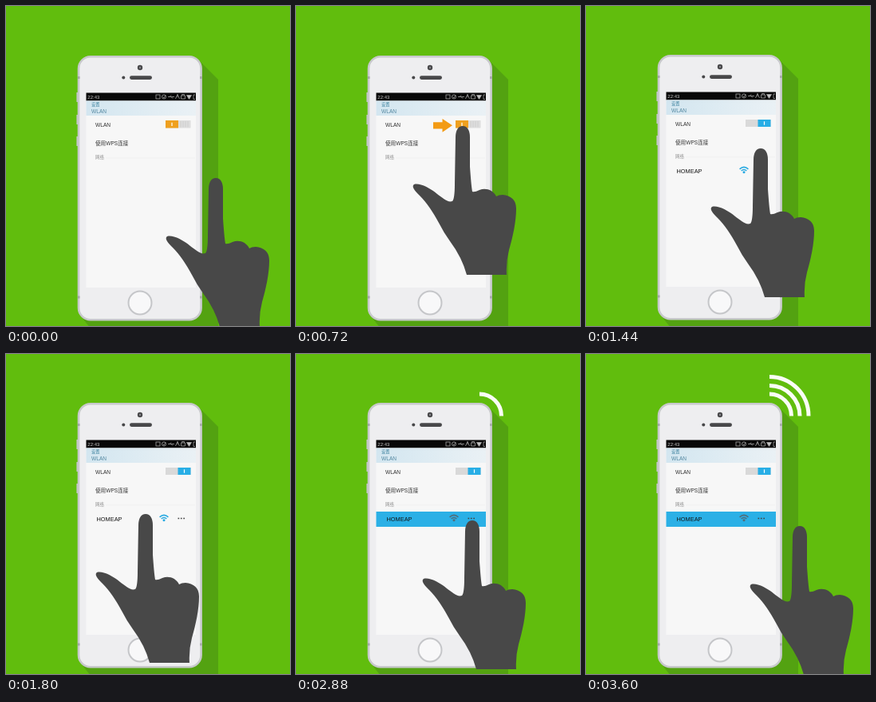
Write an HTML page that moves like this. It is 356x400 px and loops after 3960 ms.

```html
<!DOCTYPE html>
<html>
<head>
<meta charset="utf-8">
<title>WLAN</title>
<style>
  html, body { margin: 0; width: 100%; height: 100%; overflow: hidden; background: #61bd0d; }
  svg { display: block; width: 356px; height: 400px; }
  text { font-family: "Liberation Sans", "Noto Sans CJK SC", "Noto Sans CJK", sans-serif; font-size: 6.6px; fill: #303030; }

  /* Eleven held steps of 360 ms */
  .hand, .phone, .step { animation: 3960ms step-end infinite; }
  .hand { animation-name: hand; }
  .phone { animation-name: settle; }
  .step { opacity: 0; }
  .off { animation-name: off; }
  .arrow { animation-name: arrow; }
  .on { animation-name: on; }
  .list { animation-name: list; }
  .picked { animation-name: picked; }
  .tap1 { animation-name: tap1; }
  .tap2 { animation-name: tap2; }
  .wave1 { animation-name: wave1; }
  .wave2 { animation-name: wave2; }
  .wave3 { animation-name: wave3; }

  @keyframes hand {
    0% { transform: translate(263px, 215px); }
    9.09% { transform: translate(236px, 182px); }
    18.18% { transform: translate(209px, 150px); }
    27.27% { transform: translate(227px, 150px); }
    36.36% { transform: translate(219px, 178px); }
    45.45% { transform: translate(175px, 200px); }
    72.72% { transform: translate(221px, 208px); }
    81.81% { transform: translate(245px, 211px); }
    90.90%, 100% { transform: translate(268px, 215px); }
  }
  @keyframes settle { 0% { transform: translateY(1px); } 27.27%, 100% { transform: none; } }
  @keyframes off { 0% { opacity: 1; } 27.27%, 100% { opacity: 0; } }
  @keyframes arrow { 0% { opacity: 0; } 18.18% { opacity: 1; } 27.27%, 100% { opacity: 0; } }
  @keyframes on { 0% { opacity: 0; } 27.27%, 100% { opacity: 1; } }
  @keyframes list { 0% { opacity: 0; } 36.36%, 100% { opacity: 1; } }
  @keyframes picked { 0% { opacity: 0; } 54.54%, 100% { opacity: 1; } }
  @keyframes tap1 { 0% { opacity: 0; } 54.54% { opacity: 1; } 72.72%, 100% { opacity: 0; } }
  @keyframes tap2 { 0% { opacity: 0; } 63.63% { opacity: 1; } 72.72%, 100% { opacity: 0; } }
  @keyframes wave1 { 0% { opacity: 0; } 72.72%, 100% { opacity: 1; } }
  @keyframes wave2 { 0% { opacity: 0; } 81.81%, 100% { opacity: 1; } }
  @keyframes wave3 { 0% { opacity: 0; } 90.90%, 100% { opacity: 1; } }
</style>
</head>
<body>
<svg viewBox="0 0 356 400">
  <defs>
    <linearGradient id="head" x2="1" y2="0">
      <stop offset="0" stop-color="#d3e6f0"/>
      <stop offset="1" stop-color="#eaf1f5"/>
    </linearGradient>
    <g id="wifi">
      <path d="M-5.4 -1.2Q0 -6 5.4 -1.2M-3.3 1Q0 -2 3.3 1" fill="none" stroke="currentColor" stroke-width="1.6"/>
      <circle cy="2.7" r="1.5" fill="currentColor"/>
    </g>
  </defs>
  <rect width="356" height="400" fill="#61bd0d"/>

  <g class="phone">
    <path d="M240 65L266 91V402H106L94 387Z" fill="#53a211"/>
    <path d="M89.6 107V119M89.6 135V147M89.6 162V174" stroke="#c3c5c8" stroke-width="2.4"/>
    <rect x="91" y="62.2" width="153.6" height="329" rx="15" fill="#eeeef0" stroke="#c8c9cc" stroke-width="2.6"/>
    <path d="M90 88.500H92.500M243.200 88.500H245.700M90 363H92.500M243.200 363H245.700" stroke="#a4a6a8" stroke-width="3"/>
    <circle cx="168" cy="76" r="3.2" fill="#48484a"/>
    <circle cx="168" cy="76" r="1.2" fill="#85868a"/>
    <circle cx="147.300" cy="88.500" r="2" fill="#48484a"/>
    <rect x="155" y="86.300" width="28" height="4.600" rx="2.300" fill="#48484a"/>
    <circle cx="168" cy="370" r="14.500" fill="#f8f8f9" stroke="#c5c6c9" stroke-width="2"/>

    <rect x="100.500" y="107.500" width="137.500" height="243.500" fill="#f7f7f7"/>
    <rect x="100.500" y="107.500" width="137.500" height="10" fill="#080808"/>
    <rect x="100.500" y="117.500" width="137.500" height="18.500" fill="url(#head)"/>
    <text x="102.300" y="115" style="font-size:6px;fill:#c6c6c6">22:43</text>
    <g fill="none" stroke="#a0a0a0" stroke-width=".8">
      <rect x="188" y="110" width="5" height="5"/>
      <circle cx="198" cy="112.500" r="2.600"/>
      <path d="M196.700 112.500L198 114L200 110.500M203 112.500H211M205 112.500L207 110.500M207 112.500L209 114.500M212.500 115L215 109.500L217.500 115M215 109.500V113"/>
      <path d="M219.500 111H224.500V115H219.500ZM220.500 111V109.500H223.500V111M235 110H237M235 110V115.500H237"/>
      <path d="M226.500 110.500H232.500L229.500 115.500Z" fill="#c4c4c4"/>
    </g>

    <text x="107" y="124" style="font-size:5.200px;fill:#397f9c">设置</text>
    <text x="107" y="132.500" style="fill:#5488a1">WLAN</text>
    <text x="112" y="150">WLAN</text>
    <text x="112" y="172.700">使用WPS连接</text>
    <text x="112" y="189.500" style="font-size:5.400px;fill:#909090">网络</text>
    <path d="M125 189H237" stroke="#ededed" stroke-width=".7"/>

    <g class="step off">
      <rect x="200" y="142" width="31.500" height="9.500" fill="#dedede"/>
      <path d="M219 143V150.500M222 143V150.500M225 143V150.500M228 143V150.500" stroke="#cacaca" stroke-width=".8"/>
      <rect x="200" y="142" width="16" height="9.500" fill="#efa01f"/>
      <path d="M208 144.700V149" stroke="#fff" stroke-width="1.200"/>
    </g>
    <g class="step on">
      <rect x="200" y="142" width="31.500" height="9" fill="#d9d9d9"/>
      <rect x="215.500" y="142" width="16" height="9" fill="#28aee6"/>
      <path d="M223.500 144.300V148.700" stroke="#fff" stroke-width="1.200"/>
    </g>
    <path class="step arrow" d="M172 144.200H183.500V140L196 148.300L183.500 156.800V152.500H172Z" fill="#f39b14"/>

    <rect class="step picked" x="100.500" y="197" width="137.500" height="19" fill="#2bb0e6"/>
    <g class="step list">
      <text x="113.500" y="208.500" style="font-size:7.400px;fill:#151515">HOMEAP</text>
      <use href="#wifi" x="198" y="205" color="#27a9e1"/>
      <path d="M215.500 205.500H217.200M218.900 205.500H220.600M222.300 205.500H224" stroke="#444" stroke-width="1.700"/>
    </g>
    <g class="step picked">
      <use href="#wifi" x="198" y="205" color="#536d7a"/>
    </g>
  </g>

  <g fill="none" stroke="#d5edf7" stroke-width="1.700">
    <g class="step tap1">
      <circle cx="174" cy="204" r="7"/>
      <circle cx="174" cy="204" r="10.500"/>
    </g>
    <circle class="step tap2" cx="174" cy="204" r="14.500" stroke="#b5d8e6"/>
  </g>

  <g fill="none" stroke="#fafcf7" stroke-width="5">
    <path class="step wave1" d="M230 50A27.500 27.500 0 0 1 257.500 77.500"/>
    <path class="step wave2" d="M230 39.500A38 38 0 0 1 268 77.500"/>
    <path class="step wave3" d="M230 28.500A49 49 0 0 1 279 77.500"/>
  </g>

  <path class="hand" fill="#484848" d="M0 0C-6 0-9 6-9 14L-10 72Q-10 91-13 94C-19 96-25 90-32 85C-42 77-54 71-61 73C-65 76-59 82-54 87C-45 96-37 108-30 121Q-24 133-16 144Q-1 164 5 186H55Q54 170 58 155C63 138 67 119 67 103C67 92 60 87 50 86Q45 86 42 88C38 80 29 77 21 80Q15 83 12 82C11 77 10 65 9 51L9 14C9 6 6 0 0 0Z"/>
</svg>
</body>
</html>
```
